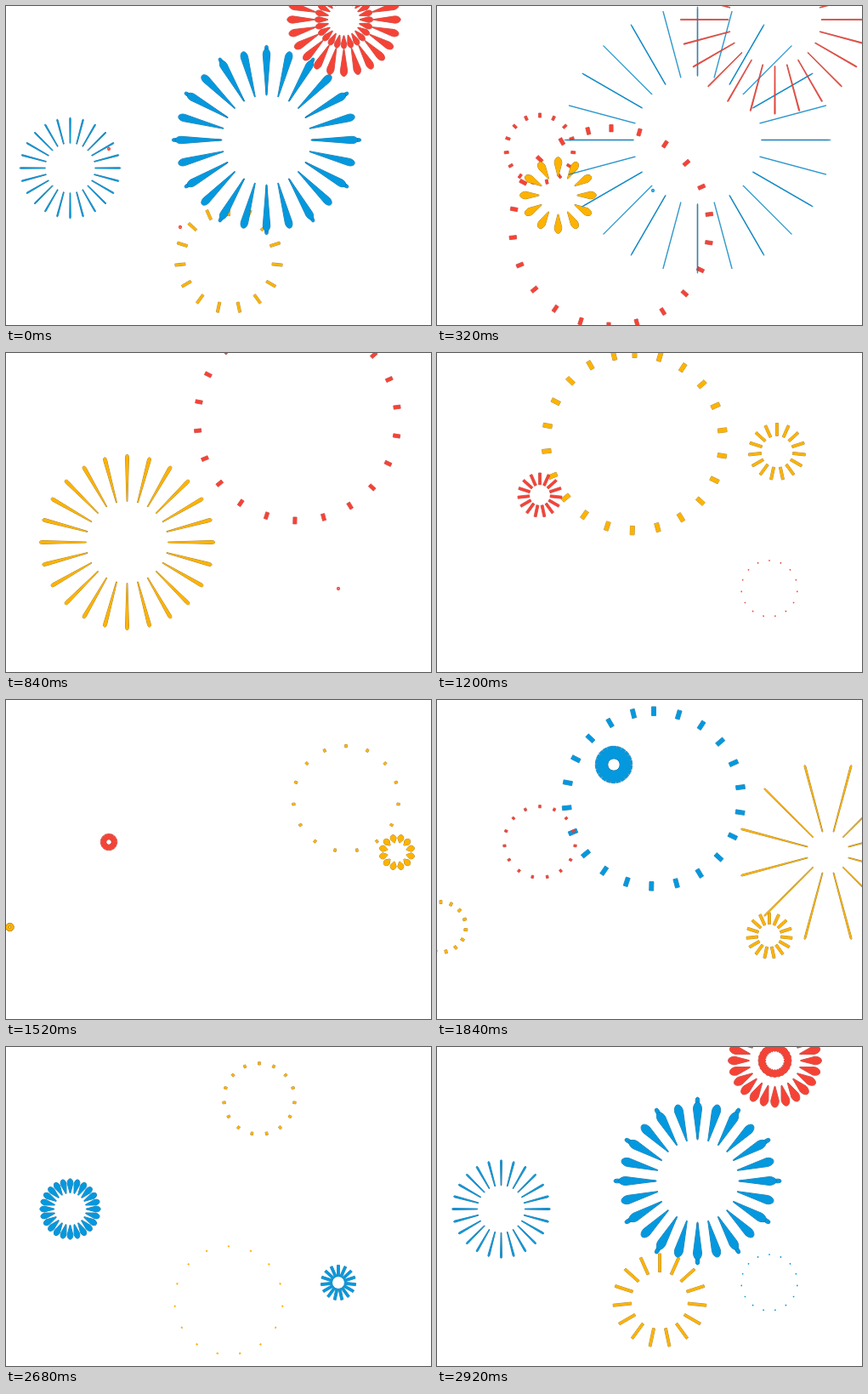
An HTML page with a canvas for the animation above (2960 ms loop, 500 by 375 pixels).

```html
<!DOCTYPE html>
<html lang="en">
<head>
<meta charset="utf-8">
<title>Fireworks</title>
<style>
  html, body { margin: 0; width: 100%; height: 100%; overflow: hidden; background: #fff; }
  canvas { display: block; }
</style>
</head>
<body>
<canvas id="sky" width="500" height="375"></canvas>
<script>
const LOOP = 2960, STEP = 40;
const ctx = document.getElementById('sky').getContext('2d');
const RED = { fill: '#f44336', edge: '#a83a38' };
const BLUE = { fill: '#0498de', edge: '#0a5d8c' };
const GOLD = { fill: '#ffb300', edge: '#8a6208' };

const clamp = (v, lo, hi) => Math.max(lo, Math.min(hi, v));
const easeOut = p => 1 - (1 - p) ** 3;

const burst = (draw, x, y, color, start, reach, life, extra) =>
  ({ draw, x, y, color, start, reach, life, ...extra });
const ring = (x, y, color, start) =>
  burst(drawDashes, x, y, color, start, 142, 690, { count: 22, turn: 16.5, wide: 5, stretch: 1 });
const pop = (x, y, color, start, reach, life = 540, stretch = 1) =>
  burst(drawDashes, x, y, color, start, reach, life, { count: 15, turn: 24, wide: 3, stretch });
const rays = (x, y, color, start, reach, life = 700, extra = {}) =>
  burst(drawRays, x, y, color, start, reach, life, { count: 24, from: 0, wide: 15, gap: 1, ...extra });

// Later entries are painted on top.
const show = [
  ring(205, 260, RED, 2958),
  ring(343, 79, RED, 509),
  ring(232.5, 104.5, GOLD, 933),
  ring(255, 116, BLUE, 1578),
  ring(208, 76, BLUE, 1803),
  ring(209.5, 223, RED, 1937),

  pop(121, 168, RED, 2958, 45),
  pop(254, 217, BLUE, 320, 33, 450),
  pop(391, 277, RED, 840, 34, 450),
  pop(121, 167, RED, 1065, 45),
  pop(400, 116, GOLD, 1053, 66, 700),
  pop(121, 167, RED, 1478, 45),
  pop(4.5, 267, GOLD, 1494, 33),
  pop(391, 277, GOLD, 1698, 45),
  pop(443, 54, RED, 2023, 45),
  pop(386, 147, RED, 1960, 34, 450),
  pop(262, 298, GOLD, 2173, 66, 700),
  pop(298, 61, GOLD, 2320, 45),
  pop(391, 277, BLUE, 2560, 34, 450),
  pop(262, 298, GOLD, 2818, 68, 240, 2.3),

  rays(142.5, 222.5, GOLD, 190, 70, 450, { count: 12, wide: 17 }),
  rays(142.5, 222.5, GOLD, 498, 119),
  rays(460, 179, GOLD, 1476, 119, 700, { count: 12, from: 15, wide: 8, gap: 0.5 }),
  rays(75.5, 190.5, BLUE, 2506, 62, 700, { wide: 12 }),
  rays(306.5, 157.5, BLUE, 2722, 156, 700, { count: 12, wide: 9 }),
  rays(306.5, 157.5, BLUE, 2752, 158, 660, { wide: 18 }),
  rays(397.5, 16, RED, 2782, 114),
  rays(397.5, 16, RED, 2877, 75, 450, { wide: 10 })
];

// The edge goes first so that only its outer half shows.
function around(b, first, turn, edge, trace) {
  ctx.beginPath();
  for (let i = 0; i < b.count; i++) {
    ctx.save();
    ctx.translate(b.x, b.y);
    ctx.rotate((first + i * turn - 90) * Math.PI / 180);
    trace();
    ctx.restore();
  }
  ctx.fillStyle = b.color.fill;
  ctx.strokeStyle = b.color.edge;
  ctx.lineWidth = edge;
  if (edge) ctx.stroke();
  ctx.fill();
}

function drawDashes(b, p) {
  const left = 1 - p;
  if (left < 0.17) return;
  const outer = Math.max(2, b.reach * easeOut(p));
  const length = clamp(25 * b.stretch * (left - 0.2), 1.5, outer * 0.67);
  const width = Math.min(b.wide, 8 * left, outer * 0.8);
  const edge = width > 2.5 ? 0.7 : 0;
  around(b, 0, b.turn, edge, () => ctx.rect(outer - length, -width / 2, length, width));
}

function drawRays(b, p) {
  if (p > 0.86) return;
  const outer = b.reach * easeOut(p);
  const base = Math.min(0.48, 0.2 + 0.42 * p) * b.gap * b.reach;
  const inner = Math.min(base, outer * 0.55);
  const width = Math.max(0.6, b.wide * (1 - p) ** 2);
  const half = width / 2;
  const tail = Math.min(half, 0.4);
  const cap = Math.min(width * 0.8, (outer - inner) / 2);
  around(b, b.from, 360 / b.count, Math.min(0.8, width * 0.6), () => {
    ctx.moveTo(inner, tail);
    ctx.lineTo(inner, -tail);
    ctx.lineTo(outer - cap, -half);
    ctx.ellipse(outer - cap, 0, cap, half, 0, -Math.PI / 2, Math.PI / 2);
    ctx.closePath();
  });
}

function render(time) {
  const t = Math.floor((time % LOOP) / STEP) * STEP;
  ctx.fillStyle = '#fff';
  ctx.fillRect(0, 0, 500, 375);
  for (const b of show) {
    const p = ((t - b.start + LOOP) % LOOP) / b.life;
    if (p < 1) b.draw(b, p);
  }
}

const begin = performance.now();
function tick() {
  render(Math.max(0, performance.now() - begin));
  requestAnimationFrame(tick);
}
tick();
</script>
</body>
</html>
```
